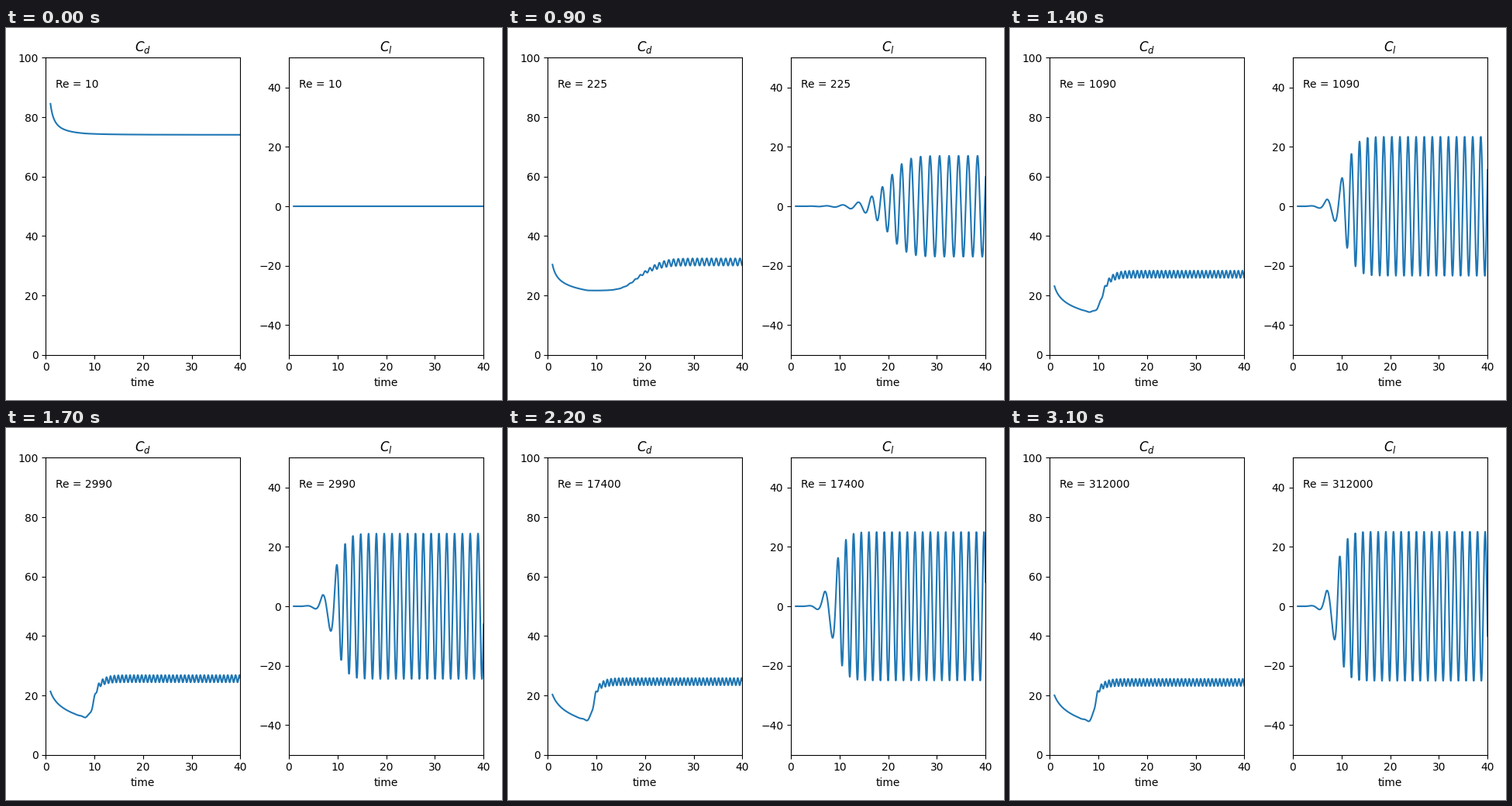
These frames come from a looping animation (640 by 480 pixels, 3200 ms). A matplotlib script:

```python
import numpy as np
import matplotlib.pyplot as plt
from matplotlib.animation import FuncAnimation

FRAMES, INTERVAL = 32, 100
time = np.linspace(1, 40, 1951)

# Reynolds number grows geometrically between these frames
RE_FRAMES = [0, 9, 14, 17, 22, 27, 31]
RE_VALUES = [10, 225, 1090, 2990, 17400, 82300, 312000]


def reynolds(frame):
    re = np.exp(np.interp(frame, RE_FRAMES, np.log(RE_VALUES)))
    digits = 2 - int(np.log10(re)) if re > 100 else 0
    return float(round(re, digits))


def soft_max(a, b, width):
    return a + width * np.logaddexp(0, (b - a) / width)


def shedding(x):
    """Phase, growth and relative amplitude of the vortex street."""
    # slow wobble at first, then a shorter steady period
    early = (time - 6.88 - 0.4 * x**2) / 3.3
    late = (time - 8.11 - 2.35 * x - 0.6 * x**2) / (1.569 + 0.38 * x)
    phase = 2 * np.pi * soft_max(early, late, 0.12 + 0.13 * x)

    growth = -1.55 - 3.25 * x + (0.53 - 0.2 * x) * (time - 6.9)
    growth -= 0.5 * max(1 - x, 0) * np.maximum(6.9 - time, 0)
    level = 1 / np.sqrt(1 + np.exp(-2 * growth))
    return phase, growth, level


def steady_drag(x):
    """Drag of the start-up flow and the plateau it decays to."""
    plateau = 11.2 + 14.1 * x / (1 + x) ** 0.457
    viscous = time ** -1.2 * np.exp(-0.08 * (time - 1))
    inertial = np.maximum(1 - np.log(time) / np.log(8.2), 0)
    mix = x / (1 + x)
    decay = (8.8 + 0.1 * x) * (mix * viscous + (1 - mix) * inertial)
    return plateau + decay, plateau


def coefficients(re):
    x = (225 / re) ** 0.9  # relative viscosity
    phase, growth, level = shedding(x)
    sat = max(25.1 - 8.1 * x**1.1, 0)
    lift = sat * level * np.cos(phase)

    drag, plateau = steady_drag(x)
    jump = max(24.35 + 14.5 * x / (1 + 1.1 * x) - plateau, 0)
    onset = (growth + 0.27 + 0.83 * x) / (0.17 + 0.33 * x)
    rise = 0.8 / (1 + np.exp(-onset)) + 0.2 * level**4
    ripple = 1.22 * min(1, sat / 17) ** 2 * level**1.5
    drag = drag + jump * rise + ripple * np.cos(2 * phase - 0.4 * np.pi)
    return drag, lift


fig, axes = plt.subplots(1, 2, figsize=(6.4, 4.8), dpi=100)
lines, labels = [], []
for ax, name, (low, high), y in zip(axes, ("$C_d$", "$C_l$"),
                                    ((0, 100), (-50, 50)), (90, 40)):
    ax.set_xlim(0, 40)
    ax.set_ylim(low, high)
    ax.set_xticks(range(0, 41, 10))
    ax.set_title(name)
    ax.set_xlabel("time")
    lines.append(ax.plot([], [], color="C0", lw=1.5)[0])
    labels.append(ax.text(2, y, ""))
axes[0].set_yticks(range(0, 101, 20))
axes[1].set_yticks(range(-40, 41, 20))
fig.tight_layout()


def draw(frame):
    re = reynolds(frame)
    for line, label, curve in zip(lines, labels, coefficients(re)):
        line.set_data(time, curve)
        label.set_text(f"Re = {re:.0f}")
    return lines + labels


anim = FuncAnimation(fig, draw, frames=FRAMES, interval=INTERVAL, repeat=True)
plt.show()
```
